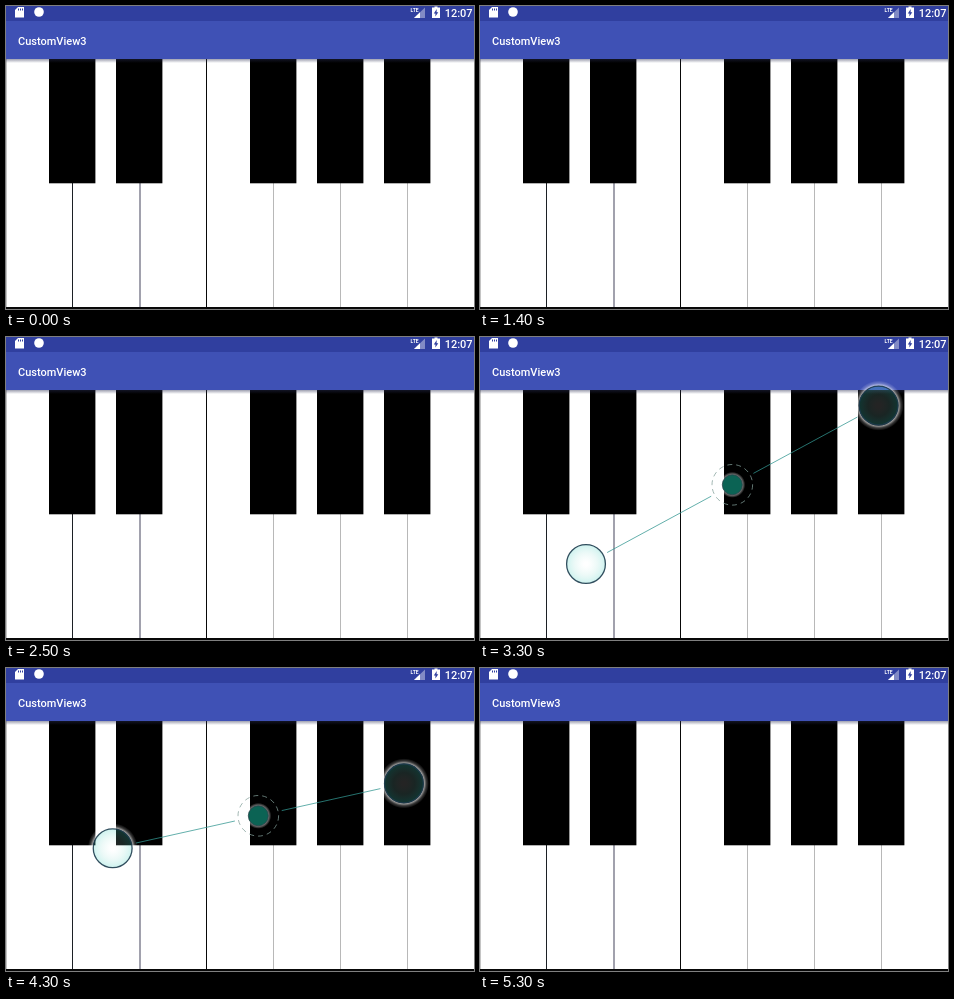
Write an HTML page with a canvas that moves like this. It is 468x303 px and loops after 5800 ms.

```html
<!DOCTYPE html>
<html lang="en">
<head>
<meta charset="utf-8">
<title>Piano view</title>
<style>
html, body { margin: 0; width: 100%; height: 100%; overflow: hidden; background: #fff; }
canvas { display: block; }
</style>
</head>
<body>
<canvas width="468" height="303"></canvas>
<script>
const ctx = document.querySelector('canvas').getContext('2d');
const LOOP = 5800, TOP = 53, BOTTOM = 301, BLACK_BOTTOM = 177;
const CYAN = '#00ffff';
const whiteEdges = [0, 66, 133.5, 200, 267, 334, 401, 468];
const edgeColors = ['#c4c4c4', '#1c2025', '#45455c', '#080808', '#b8b8b8', '#b8b8b8', '#b8b8b8'];
const blackLefts = [43, 110, 244, 311, 378];
const pivot = { x: 252.3, y: 147.8 };

// Key presses: time span with pressed white and black key indexes
const presses = [
  { from: 800, to: 900, white: [0], black: [] },
  { from: 1200, to: 1400, white: [2], black: [] },
  { from: 1700, to: 1800, white: [4], black: [] },
  { from: 2300, to: 2500, white: [6], black: [] },
  { from: 3600, to: 3800, white: [1], black: [4] },
  { from: 4900, to: 5000, white: [], black: [1, 4] }
];

function rect(x, y, w, h, color) {
  ctx.fillStyle = color;
  ctx.fillRect(x, y, w, h);
}

function polygon(points, color) {
  ctx.beginPath();
  points.forEach(([x, y]) => ctx.lineTo(x, y));
  ctx.closePath();
  ctx.fillStyle = color;
  ctx.fill();
}

function disc(x, y, r, fill) {
  ctx.beginPath();
  ctx.arc(x, y, r, 0, Math.PI * 2);
  ctx.fillStyle = fill;
  ctx.fill();
}

function ring(x, y, r, color, width) {
  ctx.beginPath();
  ctx.arc(x, y, r, 0, Math.PI * 2);
  ctx.strokeStyle = color;
  ctx.lineWidth = width;
  ctx.stroke();
}

function radial(x, y, inner, outer, ...colors) {
  const gradient = ctx.createRadialGradient(x, y, inner, x, y, outer);
  colors.forEach((color, i) => gradient.addColorStop(i / (colors.length - 1), color));
  return gradient;
}

function label(text, x, y, size, weight) {
  ctx.font = `${weight} ${size}px Roboto, sans-serif`;
  ctx.fillStyle = '#fff';
  ctx.fillText(text, x, y);
}

function drawBars() {
  rect(0, 0, 468, 15, '#303f9f');
  rect(0, 15, 468, 38, '#3f51b5');
  const shadow = ctx.createLinearGradient(0, 53, 0, 57);
  shadow.addColorStop(0, 'rgba(40,45,80,.45)');
  shadow.addColorStop(1, 'rgba(40,45,80,0)');
  rect(0, 53, 468, 4, shadow);

  polygon([[12, 1], [18, 1], [18, 11.5], [9, 11.5], [9, 4]], '#fff');
  for (const x of [12, 14, 16]) rect(x, 2.5, 1, 2, '#303f9f');
  disc(33, 6, 4.8, '#fff');

  polygon([[419, 1.5], [419, 12], [408, 12]], 'rgba(255,255,255,.4)');
  polygon([[414, 6.3], [414, 12], [408, 12]], '#fff');
  label('LTE', 404.5, 6, 5, 700);

  rect(428.5, 0.5, 3, 1.5, '#fff');
  rect(426, 1.5, 8, 10.5, '#fff');
  polygon([[430.7, 3], [427.8, 7.4], [429.5, 7.4], [429.3, 10.6], [432.3, 6.2], [430.6, 6.2]], '#303f9f');
  label('12:07', 438.7, 10.5, 11, 500);
  label('CustomView3', 12, 39, 11, 500);
}

function drawPiano(press) {
  rect(0, TOP, 468, 250, '#fff');
  for (const i of press.white) {
    rect(whiteEdges[i], TOP, whiteEdges[i + 1] - whiteEdges[i], BOTTOM - TOP, CYAN);
  }
  edgeColors.forEach((color, i) => {
    if (i || !press.white.includes(0)) rect(whiteEdges[i], TOP, 1, BOTTOM - TOP, color);
  });
  rect(0, BOTTOM, 468, 2, '#080808');
  blackLefts.forEach((x, i) => {
    rect(x, TOP, 46.4, BLACK_BOTTOM - TOP + 0.3, press.black.includes(i) ? CYAN : '#000');
  });
}

function drawFinger({ x, y }) {
  ctx.beginPath();
  ctx.arc(x, y, 25, 0, Math.PI * 2);
  ctx.arc(x, y, 19.8, 0, Math.PI * 2, true);
  ctx.fillStyle = radial(x, y, 19.8, 25, 'rgba(255,255,255,.7)', 'rgba(255,255,255,.22)', 'rgba(255,255,255,0)');
  ctx.fill();
  disc(x, y, 19.5, radial(x, y, 2, 19.5, 'rgba(255,255,255,.14)', 'rgba(150,222,212,.17)', 'rgba(60,205,190,.26)'));
  ring(x, y, 19.4, 'rgba(30,60,78,.9)', 1.3);
}

function drawPinch(finger) {
  const mirror = { x: 2 * pivot.x - finger.x, y: 2 * pivot.y - finger.y };
  const dx = finger.x - pivot.x, dy = finger.y - pivot.y;
  const length = Math.hypot(dx, dy);
  ctx.strokeStyle = 'rgba(50,150,145,.85)';
  ctx.lineWidth = 0.9;
  for (const side of [1, -1]) {
    const point = r => [pivot.x + side * dx / length * r, pivot.y + side * dy / length * r];
    ctx.beginPath();
    ctx.moveTo(...point(24));
    ctx.lineTo(...point(length - 24));
    ctx.stroke();
  }

  ctx.setLineDash([5, 4]);
  ring(pivot.x, pivot.y, 20.3, 'rgba(130,158,153,.75)', 1);
  ctx.setLineDash([]);
  disc(pivot.x, pivot.y, 13, radial(pivot.x, pivot.y, 10, 13, 'rgba(255,255,255,.5)', 'rgba(255,255,255,0)'));
  disc(pivot.x, pivot.y, 10, '#0b6354');
  ring(pivot.x, pivot.y, 10, '#26434a', 0.8);

  drawFinger(finger);
  drawFinger(mirror);
}

function fingerAt(t) {
  if (t < 3400) return { x: 106, y: 227 };
  if (t < 4000) return { x: 104.5, y: 222 };
  const p = Math.min(1, (t - 4000) / 700);
  return { x: 103 + 20 * p * p, y: 218 - 96 * p * p * (3 - 2 * p) };
}

function draw(now) {
  const t = Math.floor(now % LOOP / 100) * 100;
  const press = presses.find(p => t >= p.from && t < p.to) || { white: [], black: [] };
  drawPiano(press);
  drawBars();
  if (t >= 3300 && t < 5300) drawPinch(fingerAt(t));
}

const start = performance.now();
function tick() {
  draw(performance.now() - start);
  requestAnimationFrame(tick);
}
tick();
</script>
</body>
</html>
```
